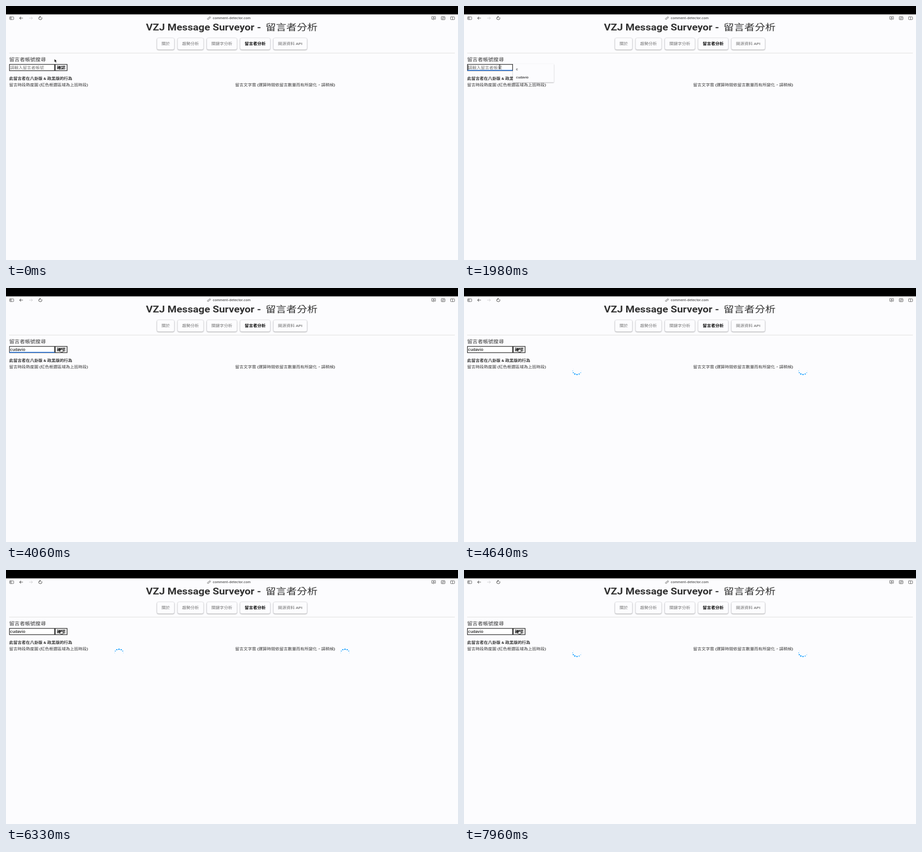
Animation of 998 by 561 pixels, one loop 8000 ms. Source, as an HTML page:

```html
<!DOCTYPE html>
<html lang="zh-Hant">
<head>
<meta charset="utf-8">
<title>留言者分析</title>
<style>
  html, body { margin: 0; width: 100%; height: 100%; overflow: hidden; background: #fcfcfe; }
  svg { display: block; width: 100%; height: 100%; }
  text { font-family: Roboto, "Noto Sans CJK TC", "Noto Sans CJK", sans-serif; white-space: pre; }
  text.ui { font-family: Inter, "Liberation Sans", sans-serif; }
  .icon { fill: none; stroke: #555; stroke-width: .9; stroke-linecap: round; stroke-linejoin: round; }
</style>
</head>
<body>
<svg id="stage" viewBox="0 0 998 561">
  <defs>
    <filter id="soft" x="-10%" y="-20%" width="120%" height="150%">
      <feDropShadow dx="0" dy="1" stdDeviation="1" flood-color="#000" flood-opacity=".4"/>
    </filter>
  </defs>
  <rect width="998" height="561" fill="#fcfcfe"/>
  <rect width="998" height="18.5" fill="#000"/>

  <g class="icon">
    <rect x="8" y="24" width="9" height="6" rx="1"/>
    <path d="M11.3 24v6M9.2 26h.8M9.2 27.6h.8"/>
    <path d="M37 26.8h-7m2.8-2.6l-2.8 2.6 2.8 2.6" stroke-width="1.1"/>
    <path d="M51.5 26.8h7m-2.8-2.6l2.8 2.6-2.8 2.6" stroke="#c8c8ca"/>
    <path d="M78.6 25.2a3.6 3.1 0 1 1-2.6-1.2m-1.2-1.4l1.6 1.4-1.6 1.4" stroke-width="1.1"/>
    <path d="M447.2 27.7l2-1.8M447.6 25.6l1.2-1.2q1.4-.9 2.4 0t0 2l-1.2 1.1M448.6 28.2l-1.2 1.1q-1.4.9-2.4 0t0-2l1.2-1.1"/>
    <path d="M940.3 23.6h8v5.5h-3l-2 1.6v-1.6h-3zM942.7 27.8l1.6-3 1.6 3M943.2 27h2.2"/>
    <rect x="961" y="23.5" width="8.4" height="6.8" rx="1.2"/>
    <path d="M962.8 25.7h4.8m-1-1l1 1-1 1M967.6 28.2h-4.8m1-1l-1 1 1 1" stroke-width=".7"/>
    <rect x="981.5" y="24" width="9" height="6" rx="1"/>
    <path d="M986 24v6"/>
  </g>

  <g id="nav"></g>
  <rect x="7" y="103.5" width="984" height="1" fill="#dededb"/>
  <g id="page"></g>

  <g id="form">
    <rect x="7.6" y="129" width="99.8" height="13.8" fill="#fff" stroke="#222" stroke-width="1.3"/>
    <rect id="button" x="108.6" y="129" width="26.4" height="13.8" stroke="#222" stroke-width="1.3"/>
    <rect id="underline" x="7.5" y="141.2" width="100" height="1.8" fill="#2270d8"/>
    <rect id="caret" x="8.8" y="131" width="1" height="10" fill="#222"/>
  </g>
  <g id="spinners" fill="#119dff"></g>
  <g id="dropdown">
    <rect x="108" y="128" width="90.3" height="40.3" rx="1" fill="#fcfcfe" filter="url(#soft)"/>
  </g>

  <path id="arrow" d="M0 0V7.2L1.8 5.7 3.1 8.4 4.3 7.9 3.1 5.3H5.4Z" fill="#000" stroke="#fff" stroke-width=".5"/>
  <path id="beam" d="M-1.8-4.2Q0-4.2 0-3 0-4.2 1.8-4.2M0-3V3.2M-1.8 4.4Q0 4.4 0 3.2 0 4.4 1.8 4.4M-1 1.4h2" fill="none" stroke="#222" stroke-width=".9"/>
  <path id="hand" d="M-1.6-3.6Q-.8-4.4 0-3.6V-.9L3.2-.4Q4.4 0 4.2 1.4L3.4 4.4H-1.2L-3.8 1.2Q-4.2-.1-3 0L-1.6 1Z" fill="#fff" stroke="#111" stroke-width=".9" stroke-linejoin="round"/>
</svg>
<script>
const LOOP = 8000;
const ASPECT = 1.17;
const ACCOUNT = 'cudavio';
const FOCUS = 1640, OPEN = 1700, PICK = 2940, SUBMIT = 4500, LOADING = 4560;
const $ = id => document.getElementById(id);

function add(parent, tag, attrs) {
  const node = document.createElementNS('http://www.w3.org/2000/svg', tag);
  for (const key in attrs) node.setAttribute(key, attrs[key]);
  return $(parent).appendChild(node);
}

function label(parent, x, y, size, content, weight = 500, fill = '#333', cls = '') {
  const node = add(parent, 'text', {
    transform: `translate(${x} ${y}) scale(${ASPECT} 1)`,
    'font-size': size, 'font-weight': weight, fill, class: cls
  });
  node.textContent = content;
  return node;
}

label('page', 456.5, 29.2, 6.35, 'comment-detector.com', 500, '#444', 'ui');
label('page', 309, 53.6, 19.66, 'VZJ Message Surveyor - ', 700);
label('page', 573, 53.6, 19.66, '留言者分析', 400);

[[333.5, 38, '關於'], [379, 57, '趨勢分析'], [443.5, 66.3, '關鍵字分析'],
 [517, 66.3, '留言者分析'], [590.5, 74, '開源資料 API']].forEach(([x, width, name], i) => {
  const active = i === 3;
  add('nav', 'rect', { x, y: 70.5, width, height: 25.5, rx: 3.5, fill: '#fcfcfe',
    stroke: '#d4d4d8', 'stroke-width': .6, filter: 'url(#soft)' });
  label('nav', x + 10, 86.4, 7.9, name, active ? 700 : 500, active ? '#000' : '#707070');
});

label('page', 7, 121.8, 9.9, '留言者帳號搜尋');
label('page', 7, 163, 7.86, '此留言者在八卦版 & 政黑版的行為', 700);
label('page', 7, 177, 7.86, '留言時段熱度圖 (紅色框選區域為上班時段)');
label('page', 506, 177, 7.9, '留言文字雲 (運算時間依留言數量而有所變化，請稍候)');

const hint = label('form', 9, 138.8, 8, '請輸入留言者帳號', 400, '#707070');
const typed = label('form', 9, 138.6, 7.6, ACCOUNT, 500, '#111', 'ui');
label('form', 112.6, 138.8, 7.9, '確認', 700, '#111');
label('dropdown', 115, 142, 6.2, 'c', 500, '#222', 'ui');
label('dropdown', 115, 159.7, 6.2, ACCOUNT, 500, '#222', 'ui');

const dots = [];
for (const cx of [249.5, 748.5])
  for (let i = 0; i < 12; i++) {
    const a = i * Math.PI / 6;
    const node = add('spinners', 'ellipse', { cx: cx + 9.5 * Math.sin(a), cy: 183 - 8.1 * Math.cos(a) });
    dots.push({ node, angle: i * 30 });
  }

const smooth = u => u * u * (3 - 2 * u);
const show = (node, on) => node.setAttribute('visibility', on ? 'visible' : 'hidden');

// time, x, y
const route = [[0, 107, 117], [120, 107, 117], [840, 87.5, 125.3], [1300, 78.8, 134], [2250, 78.8, 134],
               [2750, 126, 157], [3000, 126, 157], [3550, 122, 137]];

function pointer(t) {
  const next = route.findIndex(p => p[0] > t);
  if (next < 0) return route[route.length - 1].slice(1);
  const [t0, x0, y0] = route[next - 1], [t1, x1, y1] = route[next];
  const u = smooth((t - t0) / (t1 - t0));
  return [x0 + (x1 - x0) * u, y0 + (y1 - y0) * u];
}

function render(t) {
  const [x, y] = pointer(t);
  const open = t >= OPEN && t < PICK;
  const inRow = y > 128.5 && y < 143;
  const kind = inRow && x < 107.5 ? 'beam' : inRow && x > 108 && !open ? 'hand' : 'arrow';
  for (const id of ['arrow', 'beam', 'hand']) {
    show($(id), id === kind);
    $(id).setAttribute('transform', `translate(${x} ${y})`);
  }

  show($('dropdown'), open);
  show(hint, t < PICK);
  show(typed, t >= PICK);
  show($('underline'), t >= FOCUS && t < SUBMIT);
  show($('caret'), t >= FOCUS && t < PICK && (t - FOCUS) % 1000 < 500);
  $('button').setAttribute('fill', kind === 'hand' ? '#ebebeb' : '#f4f4f6');

  show($('spinners'), t >= LOADING);
  const peak = 250 - (t - 5200) / 668 * 360;
  for (const { node, angle } of dots) {
    const away = Math.abs(((angle - peak) % 360 + 540) % 360 - 180);
    const scale = smooth(Math.max(0, 1 - away / 144));
    node.setAttribute('rx', 1.75 * scale);
    node.setAttribute('ry', 1.5 * scale);
  }
}

const start = performance.now();
function tick() {
  render((performance.now() - start) % LOOP);
  requestAnimationFrame(tick);
}
tick();
</script>
</body>
</html>
```
